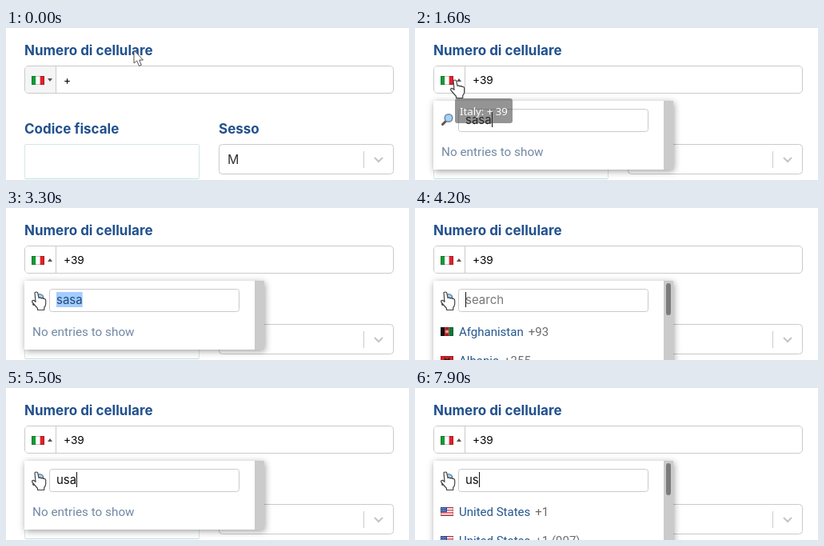
Recreate the animation shown at these times as an HTML page. Size 504 by 190 pixels, loop 8000 ms.

```html
<!DOCTYPE html>
<html lang="it">
<head>
<meta charset="utf-8">
<title>Numero di cellulare</title>
<style>
  html, body { margin: 0; width: 100%; height: 100%; overflow: hidden; background: #fff; }
  svg { display: block; width: 504px; height: 190px; }
  text { font-family: Inter, sans-serif; white-space: pre; }
  .label { font-size: 17px; font-weight: 700; fill: #21508d; }
  .box { fill: #fff; stroke: #cacaca; }
  .query { font-size: 15px; }
  .item text { font: 15px Roboto, sans-serif; fill: #24568f; }
  .item .code { fill: #6b6b6b; }
  #empty { font: 15.3px Roboto, sans-serif; fill: #7288a4; }
  #tip text { font: 13.2px "Noto Sans", sans-serif; fill: #fff; }
  #panel { filter: drop-shadow(1px 2px 4px rgba(0, 0, 0, .38)); }
</style>
</head>
<body>
<svg viewBox="0 0 504 190">
  <text class="label" x="23" y="34">Numero di cellulare</text>
  <text class="label" x="23" y="132">Codice fiscale</text>
  <text class="label" x="266" y="132">Sesso</text>

  <rect class="box" x="23.5" y="47.5" width="461" height="34" rx="4.5"/>
  <path id="flagBox" d="M62.5 48V81H28Q24 81 24 77V52Q24 48 28 48Z"/>
  <path d="M62.5 48V81" stroke="#cacaca"/>
  <g id="italy"></g>
  <path id="arrow" fill="#555"/>
  <text id="phone" x="72" y="70" font-size="13.7"></text>

  <rect x="23.5" y="145.5" width="218" height="43" rx="1" fill="#fff" stroke="#d6e6e8"/>
  <path d="M24 188.5H241" stroke="#c3dfe1"/>
  <rect class="box" x="266.5" y="145.5" width="218" height="37" rx="4"/>
  <text x="277" y="170" font-size="16" fill="#333">M</text>
  <path d="M447.5 154V175" stroke="#ccc"/>
  <path d="M461 162L466 167L471 162" fill="none" stroke="#c4c4c4" stroke-width="2"/>

  <g id="drop">
    <rect id="panel" x="23" y="91" width="300" fill="#fff"/>
    <g id="list"></g>
    <text id="empty" x="33" y="160">No entries to show</text>
    <rect x="23" y="91" width="288" height="45" fill="#fff"/>
    <rect id="track" x="311" y="91" width="12" fill="#cbcbcb"/>
    <rect id="thumb" x="314" width="6" height="40" rx="3" fill="#7c7c7c"/>
    <path d="M34.5 120.5L38.5 116.5" stroke="#5b5350" stroke-width="3" stroke-linecap="round"/>
    <circle cx="42" cy="112.5" r="4.8" fill="#a8d0f0" stroke="#6d8ca6" stroke-width="1.6"/>
    <rect class="box" x="54.5" y="101.5" width="237" height="28" rx="3"/>
    <text class="query" id="query" x="63" y="120"></text>
    <g id="selection">
      <rect id="mark" y="105" height="19" fill="#3390ff"/>
    </g>
    <rect id="caret" y="105" width="1" height="19" fill="#111"/>
  </g>

  <g id="tip">
    <rect x="50" y="88" width="72" height="31" rx="3" fill="rgba(60,60,60,.55)"/>
    <text x="56" y="109">Italy: + 39</text>
  </g>

  <path id="cursor" stroke-linejoin="round"/>
</svg>
<script>
const $ = id => document.getElementById(id);
const show = (id, on) => $(id).style.display = on ? '' : 'none';
const set = (id, attrs) => { for (const k in attrs) $(id).setAttribute(k, attrs[k]); };
const rect = (x, y, w, h, c) => `<rect x="${x}" y="${y}" width="${w}" height="${h}" fill="${c}"/>`;
const bars = colors => colors.map((c, i) => rect(i * 16 / 3, 0, 5.34, 11, c)).join('');
const rows = colors => colors.map((c, i) => rect(0, i * 11 / colors.length, 16, 11 / colors.length, c)).join('');

const flags = {
  Italy: bars(['#159a35', '#fff', '#e0202c']),
  Ireland: bars(['#169b62', '#fff', '#ff883e']),
  Iraq: rows(['#ce1126', '#fff', '#111']) + rect(5, 5, 6, 1.5, '#3b7a4b'),
  Iran: rows(['#239f40', '#fff', '#da0000']),
  Afghanistan: bars(['#111', '#c4161c', '#087a3c']) + '<circle cx="8" cy="5.5" r="2" fill="#e7a9a9"/>',
  Albania: rect(0, 0, 16, 11, '#d8202a') + '<path d="M5 2L8 4L11 2L12 6L8 10L4 6Z" fill="#222"/>',
  Australia: rect(0, 0, 16, 11, '#1b3a8c') +
    '<path d="M0 0L8 5.5M8 0L0 5.5M4 0V5.5M0 2.7H8" stroke="#fff" stroke-width="1.4"/>' +
    '<path d="M4 0V5.5M0 2.7H8" stroke="#d22" stroke-width=".8"/>' +
    '<path d="M3 8.5H5M11 3H12.5M11 8.5H12.5M13.5 5H15" stroke="#fff" stroke-width="1.4"/>',
  'United States': rows(['#d6404a', '#fff', '#d6404a', '#fff', '#d6404a', '#fff', '#d6404a']) +
    rect(0, 0, 8, 6.3, '#2f53a4') + '<path d="M1 1.8H7M1 4.2H7" stroke="#cfd8ee" stroke-dasharray="1 1"/>'
};
const flag = (name, y) =>
  `<g transform="translate(32 ${y})">${flags[name]}<rect x=".5" y=".5" width="15" height="10" fill="none" stroke="#000" stroke-opacity=".22"/></g>`;

const lists = {
  all: [['Afghanistan', '+93'], ['Albania', '+355']],
  mid: [['Iran', '+98'], ['Iraq', '+964'], ['Ireland', '+353']],
  u: [['Australia', '+61'], ['Australia', '+61 (2)']],
  us: [['United States', '+1'], ['United States', '+1 (907)']]
};

// time, search text, list shown, highlighted row
const states = [
  [1400, 'sasa', '', -1], [4200, '', 'all', -1], [4300, '', 'mid', -1],
  [5200, 'u', 'u', 0], [5300, 'us', 'us', 0], [5500, 'usa', '', -1],
  [6300, 'us', 'us', 0], [7600, 'us', 'us', 1], [7800, 'us', 'us', -1]
];

// time, x, y of the pointer's hot spot
const path = [
  [0, 160, 28], [200, 146, 36], [500, 75, 61], [700, 50, 65], [2000, 50, 65],
  [2300, 82, 86], [2500, 124, 110], [2700, 148.5, 118], [2900, 88, 116],
  [3000, 66, 113], [3200, 32, 108], [3300, 38, 105], [8000, 38, 105]
];

const shapes = {
  arrow: { d: 'M0 0V16L3.7 13L6.5 19.5L9.3 18.2L6.7 12H11.5Z', fill: '#fff', stroke: '#555' },
  beam: { d: 'M-3 -8.5H-1L0 -7.5L1 -8.5H3M0 -7.5V7.5M-3 8.5H-1L0 7.5L1 8.5H3', fill: 'none', stroke: '#444', 'stroke-width': 1.4 },
  hand: { d: 'M-2 1Q0 -1 1.7 1L3 7.5Q4.6 6 6 8Q7.8 6.8 9 8.5Q11.5 8 11.7 10.5V15Q11.5 18 9.7 19.5V22.5H1.5V20.5Q-2 16.5 -5 13Q-6.3 10.3 -3.5 10.3L-1 12.3Z', fill: '#fff', stroke: '#444', 'stroke-width': 1.2 }
};

function pointer(t) {
  const i = path.findIndex(p => p[0] > t);
  const [t0, x0, y0] = path[i - 1], [t1, x1, y1] = path[i];
  const k = (t - t0) / (t1 - t0);
  return [x0 + (x1 - x0) * k, y0 + (y1 - y0) * k];
}

function pointerKind(t, x, y) {
  if (t > 2700 && t < 3300) return 'beam';
  if (y > 47 && y < 82) return x < 62 ? 'hand' : 'beam';
  if (t >= 1400 && y > 91) return x > 54 && y > 101 ? 'beam' : 'hand';
  return 'arrow';
}

function drawList(name, active) {
  const top = name === 'mid' ? 111 : 136;
  $('list').innerHTML = (lists[name] || []).map(([country, code], i) => {
    const y = top + i * 36;
    return `<g class="item">${i === active ? rect(23, y, 288, 36, '#f0f0f0') : ''}${flag(country, y + 13)}` +
      `<text x="55" y="${y + 24}">${country}<tspan class="code" dx="6">${code}</tspan></text></g>`;
  }).join('');
}

let last = -1;
function draw(now) {
  requestAnimationFrame(draw);
  const t = Math.floor(now % 8000 / 100) * 100;
  if (t === last) return;
  last = t;

  const open = t >= 1400;
  const [x, y] = pointer(t);
  const kind = pointerKind(t, x, y);
  set('cursor', { 'stroke-width': 1, ...shapes[kind], transform: `translate(${x} ${y})` });
  set('flagBox', { fill: open || kind === 'hand' ? '#fff' : '#f5f5f5' });
  set('arrow', { d: open ? 'M52 67L55 63L58 67Z' : 'M52 63L55 67L58 63Z' });
  $('phone').textContent = open ? '+39' : '+';
  show('drop', open);
  show('tip', t >= 1500 && t < 1900);
  set('tip', { opacity: t < 1600 ? .5 : 1 });
  if (!open) return;

  const [, word, name, active] = states.findLast(s => s[0] <= t);
  const height = name ? 200 : 86;
  set('panel', { height });
  set('track', { height });
  show('thumb', name);
  set('thumb', { y: name === 'mid' ? 165 : 94 });
  show('empty', !name);
  drawList(name, active);

  const query = $('query');
  query.textContent = word || 'search';
  set('query', { fill: word ? '#111' : '#777' });
  const end = 63 + (word ? query.getComputedTextLength() : 0);
  const selecting = t > 2700 && t < 4200;
  const from = Math.min(end, Math.max(63, x));
  show('selection', selecting);
  set('mark', { x: from, width: end - from, 'fill-opacity': .45 });
  show('caret', !selecting && !(t >= 6600 && t < 7900));
  set('caret', { x: Math.round(end) });
}

$('italy').innerHTML = flag('Italy', 60);
requestAnimationFrame(draw);
</script>
</body>
</html>
```
